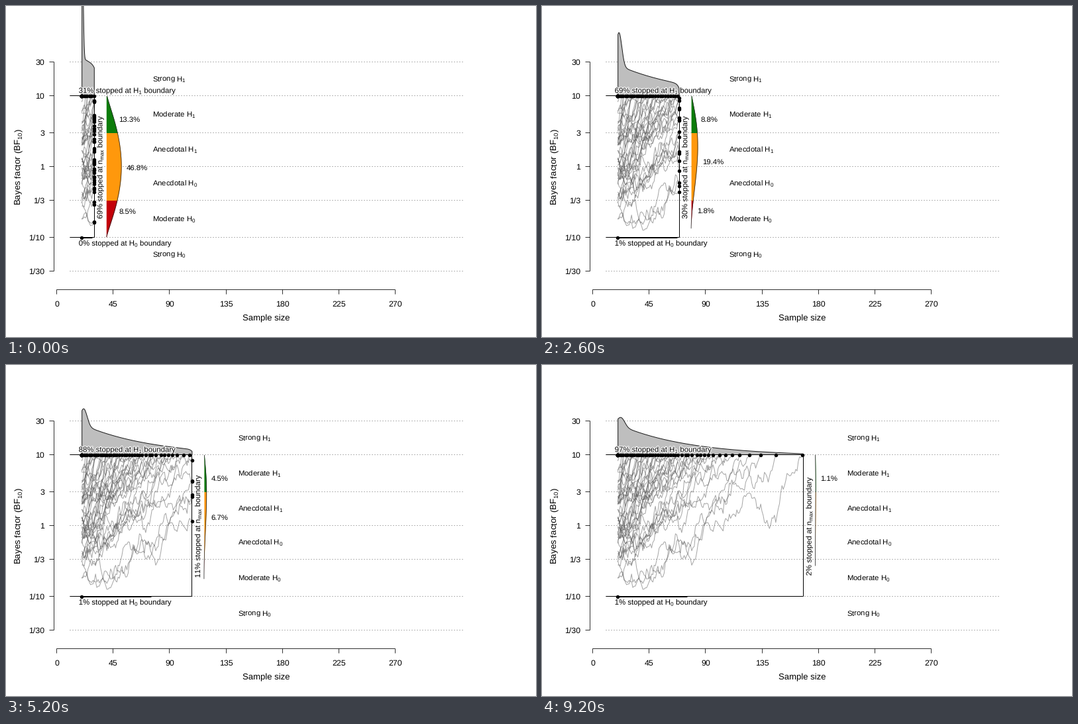
These frames come from a looping animation (800 by 500 pixels, 9400 ms). A matplotlib script:

```python
import numpy as np
import matplotlib.pyplot as plt
from matplotlib.animation import FuncAnimation
from matplotlib.collections import LineCollection
from matplotlib.patheffects import withStroke

plt.rcParams.update({
    "font.family": "Liberation Sans",
    "mathtext.fontset": "custom",
    "mathtext.rm": "Liberation Sans",
    "mathtext.default": "regular",
    "text.hinting": "none",
})

PX = 0.72  # points per pixel at 100 dpi
FRAMES, STEP_MS = 47, 200
FIRST_N, STUDIES = 20, 60
TOP, BOTTOM = 135.5, 349.5
GREEN, ORANGE, RED = "#0c7c0a", "#ff980c", "#c30009"

# Share of undecided studies (%) by evidence class at a few sample sizes
KEY_N = [20, 30, 57, 84, 108, 132, 150, 168]
GREEN_PCT = [14, 13.3, 10.6, 6.9, 4.5, 2.6, 1.7, 1.1]
ORANGE_PCT = [56, 46.8, 25.7, 13.6, 6.7, 3.1, 1.6, 0.9]
RED_PCT = [11, 8.5, 3.1, 0.96, 0.2, 0.08, 0.02, 0.01]


def px(n):
    return 76.5 + np.asarray(n) * 511 / 270


def py(bf):
    return 242.5 - 46.45 * np.log(bf)


def share(n, pct):
    return np.exp(np.interp(n, KEY_N, np.log(pct)))


def undecided(n):
    return share(n, GREEN_PCT) + share(n, ORANGE_PCT) + share(n, RED_PCT)


def fade(n):
    return np.exp((30 - n) / 62)


def stopping_sizes():
    """Spread the studies over the curve of undecided shares."""
    n = np.arange(FIRST_N, 169)
    level = 100 * (np.arange(STUDIES) + 1.25) / STUDIES
    return np.rint(np.interp(-level, -undecided(n), n)).astype(int)


def study_path(stop, rng, dips=()):
    """Noisy rise from a random start to the upper boundary."""
    n = np.arange(FIRST_N, stop + 1)
    t = (n - FIRST_N) / max(stop - FIRST_N, 1)
    late = np.sqrt((stop - FIRST_N) / 144)
    start = np.clip(185 + 110 * late + rng.normal(0, 38), 145, 322)
    noise = np.zeros(len(n))
    for i in range(1, len(n)):
        noise[i] = 0.9 * noise[i - 1] + rng.normal(0, 6)
    y = start + (TOP - start) * t ** 1.5 + noise - noise[-1] * t
    for centre, depth in dips:
        y += depth * np.exp(-((n - centre) / 8) ** 2)
    y = 138 + np.abs(y - 138)
    y = 347 - np.abs(347 - y)
    y[-1] = TOP
    return np.column_stack([px(n), y])


rng = np.random.default_rng(12)
STOPS = stopping_sizes()
# The longest study nearly reaches the lower boundary and falls back late
PATHS = [study_path(s, rng, ((44, 42), (143, 45)) if s == STOPS.max() else ())
         for s in STOPS]

fig = plt.figure(figsize=(8, 5), dpi=100, facecolor="white")
ax = fig.add_axes([0, 0, 1, 1])
ax.set_xlim(0, 800)
ax.set_ylim(500, 0)
ax.axis("off")


def line(x, y, width=0.8, color="black", z=3, **kw):
    return ax.plot(x, y, color=color, lw=width * PX, zorder=z,
                   solid_capstyle="butt", **kw)[0]


def rule(x0, y0, x1, y1, width=0.8, **kw):
    """Straight line through pixel centres; snapping adds half a pixel."""
    return line([x0 - 0.5, x1 - 0.5], [y0 - 0.5, y1 - 0.5], width, **kw)


def label(x, y, s, size=11.4, ha="left", z=5, halo=False, **kw):
    t = ax.text(x, y, s, fontsize=size * PX, ha=ha, va="baseline", zorder=z,
                rotation_mode="anchor", **kw)
    if halo:
        t.set_path_effects([withStroke(linewidth=2.4 * PX, foreground="white")])
    return t


def dots(x, y):
    return ax.plot(x, y, "o", color="black", ms=5.5 * PX, mew=0, zorder=6)[0]


def draw_axes():
    for bf in (30, 10, 3, 1, 1 / 3, 1 / 10, 1 / 30):
        y = py(bf)
        rule(96, y, 690, y, 1, color="#6e6e6e", z=0, linestyle=(0, (1, 3)),
             dash_capstyle="butt")
        rule(65, y, 72.5, y)
        name = f"{bf:g}" if bf >= 1 else f"1/{1 / bf:.0f}"
        label(58, y + 4.5, name, 12.4, "right")
    rule(72.5, py(30), 72.5, py(1 / 30))
    rule(px(0), 428.5, px(270), 428.5)
    for n in range(0, 271, 45):
        rule(px(n), 428.5, px(n), 435.5)
        label(px(n), 454.3, str(n), 12.4, "center")
    label(392.5, 475.7, "Sample size", 13.1, "center")
    label(23.6, 243, "Bayes factor (BF$_{10}$)", 13.4, "center", rotation=90)


def draw_top_density(n, end):
    x = np.linspace(px(FIRST_N) + 0.3, end, 260)
    tail = 48 * np.exp((114 - x) / 108) - 2
    tail *= 1 + 0.25 * np.exp((30 - n) / 12)
    centre, spread = 114 + n / 30, 6.3 - 145 / n
    h = tail + 67 * (57 / n) ** 1.55 * np.exp(-0.5 * ((x - centre) / spread) ** 2)
    drop = min(0.4, 0.12 + 0.01 * (n - 30))
    h *= 1 - drop * np.exp((x - end) / 3)
    edge_x = np.r_[x[0], x, end]
    edge_y = np.r_[TOP, TOP - h, TOP]
    fill = ax.fill(edge_x, edge_y, color="#bebebe", lw=0, zorder=1)[0]
    return [fill, line(edge_x, edge_y, 1, "#1a1a1a", z=1.5)]


def draw_side_density(n, base):
    width = undecided(n) / 3
    end = 349 - 0.33 * (n - 30)
    span = end + 2 - 130
    mode = (48 + 64 * fade(n)) / span

    def reach(y):
        t = np.clip((y - 130) / span, 0, 1)
        rise = (t / mode) ** 1.3
        return width * rise * ((1 - t) / (1 - mode)) ** (1.3 * (1 / mode - 1))

    out = []
    for a, b, color in ((136, 191.5, GREEN), (191.5, 293.5, ORANGE),
                        (293.5, end, RED)):
        y = np.linspace(a, b, 60)
        out.append(ax.fill_betweenx(y, base, base + reach(y), color=color,
                                    lw=0, zorder=2))
    y = np.linspace(136, end, 160)
    out.append(line(base + reach(y), y, 0.8, "#2a2a2a"))

    for pct, mid in ((GREEN_PCT, 170.5), (ORANGE_PCT, 223.5 + 20.5 * fade(n)),
                     (RED_PCT, 306.5 + 3.5 * fade(n))):
        value = round(float(share(n, pct)), 1)
        if value >= 1:
            out.append(label(base + reach(mid) + 7.4, mid + 4.3, f"{value:g}%"))

    bounds = py(np.array([30, 10, 3, 1, 1 / 3, 1 / 10, 1 / 30]))
    names = ["Strong H$_1$", "Moderate H$_1$", "Anecdotal H$_1$",
             "Anecdotal H$_0$", "Moderate H$_0$", "Strong H$_0$"]
    for name, mid in zip(names, (bounds[:-1] + bounds[1:]) / 2):
        out.append(label(base + 47 + width, mid + 3.6, name))
    return out


def draw_paths(n, end):
    shown = [p[:n - FIRST_N + 1] for p in PATHS]
    lines = LineCollection(shown, colors=[(0.3, 0.3, 0.3, 0.5)],
                           linewidths=PX, zorder=2)
    ax.add_collection(lines)
    hits = [p[-1, 0] for p, s in zip(PATHS, STOPS) if s <= n]
    running = [p[n - FIRST_N, 1] for p, s in zip(PATHS, STOPS) if s > n]
    return [lines, dots(hits, [TOP] * len(hits)),
            dots([end] * len(running), running),
            dots([px(FIRST_N)], [BOTTOM])]


def draw_boundaries(n, end):
    h0 = min(0.8, 0.1 + 0.03 * (n - 30))
    h1 = 100 - undecided(n) - h0
    text = "{:.0f}% stopped at {} boundary"
    return [
        rule(96, TOP, end, TOP, 1, z=4),
        rule(96, BOTTOM, end, BOTTOM, 1, z=4),
        rule(end, TOP, end, BOTTOM, 1, z=4),
        line([px(FIRST_N), min(219, end - 3)], [350, 350], 1, z=4),
        label(109.7, 131.4, text.format(h1, "H$_1$"), z=2.5, halo=True),
        label(109.7, 362, text.format(h0, "H$_0$"), z=2.5, halo=True),
        label(end + 12.2, 243.3, text.format(undecided(n), "n$_{max}$"),
              ha="center", halo=True, rotation=90),
    ]


draw_axes()
moving = []


def update(frame):
    for artist in moving:
        artist.remove()
    n = 30 + 3 * frame
    end = float(px(n))
    moving[:] = (draw_top_density(n, end) + draw_side_density(n, end + 18)
                 + draw_paths(n, end) + draw_boundaries(n, end))
    return moving


anim = FuncAnimation(fig, update, frames=FRAMES, interval=STEP_MS,
                     init_func=lambda: [], repeat=True, repeat_delay=0, blit=False)
plt.show()
```
